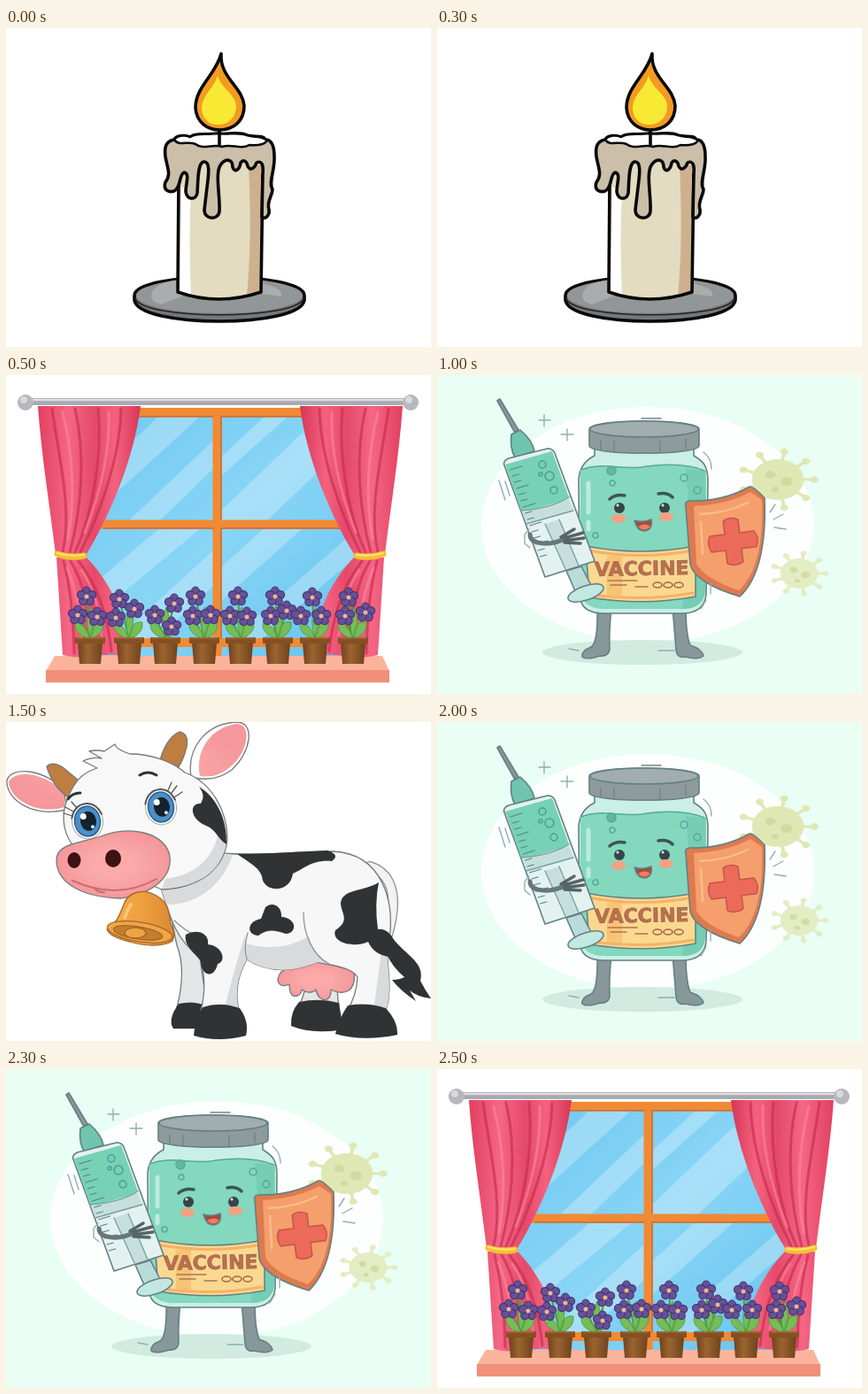
Write an HTML page that moves like this. It is 480 by 360 pixels and loops after 3 s.

```html
<!DOCTYPE html>
<html lang="en">
<head>
<meta charset="utf-8">
<title>Picture slideshow</title>
<style>
  html, body { margin: 0; width: 100%; height: 100%; overflow: hidden; background: #fff; }
  svg { display: block; width: 100vw; height: 100vh; }
  .scene { display: none; }
  .scene.on { display: inline; }
  path, ellipse, circle, line { stroke-linecap: round; stroke-linejoin: round; }
  #candle .ink { stroke: #080808; stroke-width: 3.6; }
  #vaccine .ink { stroke: #648083; stroke-width: 1.6; }
  #cow .ink { stroke: #77797b; stroke-width: 1.3; }
  .none { fill: none; }
</style>
</head>
<body>
<svg viewBox="0 0 480 360">
  <defs>
    <linearGradient id="glass" x2="1" y2="1">
      <stop stop-color="#70c8f1"/><stop offset=".5" stop-color="#88d5f6"/><stop offset="1" stop-color="#67c3ef"/>
    </linearGradient>
    <linearGradient id="cloth">
      <stop stop-color="#e2405f"/><stop offset=".3" stop-color="#f56685"/><stop offset=".55" stop-color="#e5496a"/>
      <stop offset=".75" stop-color="#f4627f"/><stop offset="1" stop-color="#d73757"/>
    </linearGradient>
    <linearGradient id="pot">
      <stop stop-color="#70421d"/><stop offset=".4" stop-color="#9b642f"/><stop offset="1" stop-color="#70421d"/>
    </linearGradient>
    <radialGradient id="skin"><stop offset=".4" stop-color="#fba9a9"/><stop offset="1" stop-color="#f5979b"/></radialGradient>
    <linearGradient id="brass"><stop stop-color="#f6ad4a"/><stop offset=".5" stop-color="#f0a040"/><stop offset="1" stop-color="#d98a33"/></linearGradient>
  </defs>

  <g id="candle" class="scene">
    <path class="ink" fill="#747879" d="M145 302C145 274 337 274 337 302V307C333 339 149 339 145 307Z"/>
    <ellipse cx="241" cy="302" rx="94" ry="20" fill="#929696"/>
    <path fill="#a9adad" d="M164 302C166 286 194 284 200 284V302L175 312Q164 309 164 302ZM287 288Q314 293 311 303L289 300Z"/>
    <path class="none" stroke="#222" stroke-width="1.5" d="M146 305C153 330 329 330 336 305"/>
    <path fill="#e3dcc1" d="M195 145L194 298Q240 314 288 298L290 145Z"/>
    <path fill="#fff" d="M198 180H209Q206 240 209 303L196 298Z"/>
    <path fill="#cdb18f" d="M274 155H289L287 298L272 303Q278 240 274 155Z"/>
    <path class="ink none" d="M195 170L194 298Q240 314 288 298L290 165"/>
    <path class="ink" fill="#cbbfaa" d="M190 126C179 128 179 137 180 145C182 158 187 165 180 174C177 183 184 186 190 184C198 180 195 166 201 163C208 164 203 175 203 185C205 195 215 194 216 186C217 175 216 153 223 151C231 150 229 165 227 180L224 205C224 217 240 217 241 207C242 190 236 165 242 155C248 146 256 148 256 157C258 164 264 160 265 152C268 148 272 150 273 156C276 162 281 158 283 152C289 149 291 155 290 165L289 213C292 217 298 212 297 205C294 195 301 190 301 182C296 175 304 160 303 145C303 133 300 126 293 126C290 120 280 124 272 121C262 116 250 121 240 119C225 121 215 118 208 123C200 120 192 122 190 126Z"/>
    <path fill="#fff" stroke="#080808" stroke-width="2.5" d="M190 126C195 134 205 127 214 131C222 138 235 130 244 134C255 130 265 138 275 132C285 133 295 131 294 126C286 121 280 124 272 121C262 117 250 121 240 119C225 121 215 118 208 123C200 120 193 122 190 126Z"/>
    <path class="ink" d="M241 113V132"/>
    <path class="ink" fill="#f39a22" d="M243 29C237 53 214 66 214 90C215 107 228 115 241 115C258 115 269 104 269 88C268 67 241 56 243 29Z"/>
    <path fill="#f8e934" d="M239 53C236 67 221 76 221 91C222 104 231 110 240 109C252 109 260 100 260 88C259 74 242 68 239 53Z"/>
  </g>

  <g id="window" class="scene">
    <rect x="86" y="38" width="312" height="282" fill="url(#glass)"/>
    <g fill="#fff" opacity=".27">
      <path d="M172 47H219L120 137V96ZM234 74V106L174 164H139ZM292 47H318L243 114V92ZM335 65L362 100L295 164H243V153Z"/>
      <path d="M172 174H219L105 268V231ZM234 198V238L170 297H126ZM290 174H334L243 255V217ZM385 184L395 205L290 297H255Z"/>
    </g>
    <path class="none" stroke="#f18a35" stroke-width="10" style="stroke-linecap:butt" d="M86 42H398M238.500 40V318M86 168.500H398M86 302H398"/>
    <path class="none" stroke="#cf682b" stroke-width="1.500" d="M110 173H234M243 173H385M243 47V163M243 174V297M145 47H234M243 47H340"/>
    <path d="M55 317H425L433 334H45Z" fill="#fbb49b"/>
    <path d="M45 333H433V347H45Z" fill="#f28f79"/>
    <path d="M20 30H458" stroke="#a9a9b1" stroke-width="8"/>
    <path d="M22 28H457" stroke="#dedee3" stroke-width="2.500"/>
    <g id="curtain">
      <path fill="url(#cloth)" d="M36 35H152C145 92 118 158 91 202H56C49 145 40 90 36 35ZM57 206H91C107 222 123 247 129 270L134 318C110 311 90 323 64 316Z"/>
      <path class="none" stroke="#c72d4e" stroke-width="3" opacity=".65" d="M52 38C60 95 75 152 64 200M78 38C91 94 84 156 72 200M104 38C109 92 98 156 78 200M130 38C129 92 107 154 84 200M65 210Q76 252 77 314M73 210Q95 246 96 312M82 210Q113 250 119 312"/>
      <path class="none" stroke="#ff8ba2" stroke-width="3" opacity=".55" d="M64 42C77 95 77 145 70 185M116 42C118 92 103 142 89 178M69 218Q84 254 86 300M85 220Q105 249 108 294"/>
      <path class="none" stroke="#f2c22f" stroke-width="7" d="M58 202Q72 207 88 204"/>
      <path class="none" stroke="#ffe46c" stroke-width="2" d="M58 201Q72 205 88 203"/>
    </g>
    <use href="#curtain" transform="matrix(-1 0 0 1 484 0)"/>
    <circle cx="22" cy="31" r="9" fill="#b7b7be"/><circle cx="20" cy="28" r="4" fill="#d8d8dd"/>
    <circle cx="457" cy="31" r="9" fill="#b7b7be"/><circle cx="455" cy="28" r="4" fill="#d8d8dd"/>
    <g id="pots"></g>
  </g>

  <g id="vaccine" class="scene">
    <path fill="#e9fef4" d="M0 0H480V360H0Z"/>
    <ellipse cx="238" cy="169" rx="188" ry="133" fill="#fdfffe"/>
    <ellipse cx="232" cy="313" rx="113" ry="14" fill="#d2ebe1"/>
    <g id="viruses"></g>
    <g class="ink" fill="#87979a">
      <path d="M181 262H197Q194 290 195 310Q193 318 184 317Q170 322 164 318Q163 311 174 307Q182 302 181 262Z"/>
      <path d="M266 262H281Q281 293 286 305Q299 309 301 317Q295 322 280 318Q271 320 270 310Z"/>
    </g>
    <path class="ink" fill="#c9efe6" d="M178 84H290V91C302 98 306 104 306 120L304 247C303 262 294 269 276 269H188C169 269 161 261 161 246L160 120C160 104 168 96 178 91Z"/>
    <path fill="#83d8be" d="M162 107C186 97 211 109 237 103Q278 98 304 108V194H162Z"/>
    <path fill="#83d8be" d="M163 190H303V243Q301 264 278 264H190Q163 264 163 243Z"/>
    <path fill="#68c4aa" opacity=".5" d="M281 106L303 108V244Q301 264 276 264Q291 210 281 106Z"/>
    <path class="none" stroke="#d6f4ea" stroke-width="5" opacity=".7" d="M171 122V155M171 166V174"/>
    <g class="none" stroke="#5aa898" stroke-width="1.500">
      <path d="M163 107C186 97 211 109 237 103Q278 98 302 108"/>
      <circle cx="197" cy="108" r="5" fill="#5fb8a1"/><circle cx="198" cy="122" r="3"/><circle cx="279" cy="116" r="4"/><circle cx="294" cy="130" r="4"/><circle cx="179" cy="181" r="3"/>
    </g>
    <path class="ink" fill="#8d9b9d" d="M172 61C172 49 296 49 296 61V80C295 91 173 91 172 80Z"/>
    <ellipse class="ink" cx="234" cy="61" rx="61" ry="9" fill="#a1adae"/>
    <path class="none" stroke="#758487" stroke-width="1.500" d="M185 74V84M200 75V86M252 75V87M281 72V83M231 49H253"/>
    <path class="ink" fill="#fbd890" d="M168 193Q230 205 292 193V250Q234 261 172 251Z"/>
    <path class="none" stroke="#f5b268" stroke-width="3" d="M170 198Q230 209 290 198M174 248Q232 256 289 246"/>
    <path d="M192 204H209V251H192Z" fill="#f5b768" opacity=".6"/>
    <text x="178" y="226" font-family="'DejaVu Sans',sans-serif" font-size="22" font-weight="700" fill="#bb714f" stroke="#8f5a47" stroke-width=".6" transform="rotate(-1 232 220)">VACCINE</text>
    <path class="none" stroke="#b0754f" stroke-width="1.500" d="M193 232H226M196 237H214M224 239H238"/>
    <g class="none" stroke="#a36547" stroke-width="1.500"><ellipse cx="249" cy="237" rx="5" ry="3"/><ellipse cx="261" cy="237" rx="5" ry="3"/><ellipse cx="273" cy="237" rx="5" ry="3"/></g>
    <g fill="#364548"><circle cx="206" cy="150" r="6"/><circle cx="257" cy="150" r="6"/></g>
    <g fill="#dff5ee"><circle cx="204" cy="147" r="1.500"/><circle cx="255" cy="147" r="1.500"/></g>
    <path class="none" stroke="#3f5355" stroke-width="3.500" d="M195 140Q202 134 212 136M250 134Q260 132 266 138"/>
    <g fill="#f6a083"><ellipse cx="205" cy="162" rx="8" ry="5"/><ellipse cx="259" cy="160" rx="8" ry="5"/></g>
    <path class="ink" fill="#a14c42" d="M223 164Q232 167 242 163Q244 175 234 176Q226 176 223 164Z"/>
    <path fill="#f47b61" d="M227 171Q235 166 241 171Q234 178 227 171Z"/>

    <path class="ink" fill="#8a9899" d="M68 29L71 27L92 62L88 65Z"/>
    <path class="ink" fill="#6fc5ae" d="M84 67L94 62Q108 74 110 86L88 93Q82 82 84 67Z"/>
    <path class="ink" fill="#e3f2f1" d="M76 102Q74 97 81 94L125 83Q131 83 133 88L178 210L122 228Z"/>
    <path fill="#77d1b5" d="M77 101L130 86L149 138Q128 151 95 153Z"/>
    <path fill="#c6dfdd" d="M96 155L149 140L154 153L101 168ZM122 168L138 163L160 215L145 219Z"/>
    <path class="none" stroke="#76a09c" stroke-width="1.300" d="M95 153Q128 151 149 138M101 168L154 153M122 168L145 219M138 163L160 215"/>
    <path id="ticks" class="none" stroke="#5a8581" stroke-width="1.300"/>
    <g class="none" stroke="#4d9e8e" stroke-width="1.500"><circle cx="119" cy="101" r="4"/><circle cx="127" cy="114" r="5"/><circle cx="132" cy="130" r="4"/><circle cx="117" cy="112" r="2"/></g>
    <path class="ink" fill="#b9dcda" d="M146 221L163 216L176 241L157 246Z"/>
    <ellipse class="ink" cx="168" cy="246" rx="21" ry="8" transform="rotate(-19 168 246)" fill="#c2e8e1"/>
    <path class="none" stroke="#66777a" stroke-width="5" d="M105 180Q105 189 120 190Q133 191 146 184"/>
    <path class="none" stroke="#566568" stroke-width="3.500" d="M140 183L155 174M144 184L165 178M144 187L166 184M144 189L162 190"/>

    <path class="ink" fill="#dd7a50" d="M281 149Q279 143 285 142Q323 143 353 126Q358 126 370 139Q373 221 342 250Q292 235 286 214Z"/>
    <path fill="#f59f6c" d="M290 148Q328 146 354 132L367 141Q370 216 341 243Q302 230 293 213Z"/>
    <path class="none" stroke="#fbbd8a" stroke-width="2.500" d="M297 157Q327 156 351 144M298 166L300 202"/>
    <path fill="#ec6a5a" stroke="#c2574c" stroke-width="1.500" transform="rotate(-7 334 188)" d="M326 164Q334 159 343 164V179H359Q365 187 360 197H343V212Q334 217 325 212V197H309Q304 188 309 179H326Z"/>
    <path class="none" stroke="#8fb0b1" stroke-width="1.400" d="M121 45V58M115 51H128M147 61V74M140 67H154M301 87Q310 94 310 106M380 163L391 157M381 172L394 174M376 155L382 146M77 120L82 136M70 119L77 141M104 174L99 180V190L105 195M309 235V247M304 254L298 264M149 309L160 311M250 311H268"/>
  </g>

  <g id="cow" class="scene">
    <path class="none" stroke="#8b8d8f" stroke-width="12" d="M411 163C441 173 441 206 431 240"/>
    <path class="none" stroke="#f2f2f3" stroke-width="9.500" d="M411 163C441 173 441 206 431 240"/>
    <path fill="#303234" d="M434 240C448 262 474 270 468 292Q473 302 480 312Q464 310 456 303L463 315Q445 303 436 291Q444 291 450 288Q436 276 430 262Z"/>
    <g class="ink" fill="#e4e5e6"><path d="M187 223L215 238L227 322H193Q204 280 193 252Z"/><path d="M338 255L386 265Q370 290 376 320H331Q344 295 338 255Z"/></g>
    <path fill="#303234" d="M195 318Q211 314 226 320L228 346H189Q182 336 195 318ZM331 316Q354 311 376 317L381 347Q347 353 322 343Q321 327 331 316Z"/>
    <path class="ink" fill="url(#skin)" d="M310 283C304 292 308 301 320 296C320 316 334 310 334 302C341 307 348 305 350 302C354 319 368 316 367 302C381 309 396 305 393 282C381 266 326 264 310 283Z"/>
    <path class="ink" fill="#f7f7f7" d="M175 187C184 216 190 244 219 266Q228 294 220 326H263C257 299 265 281 272 268C300 286 331 280 352 271C376 276 391 278 397 288Q396 308 385 327H429C439 292 426 270 433 245C439 202 425 149 370 146C320 146 290 152 245 148Z"/>
    <path fill="#d9dadb" d="M271 250Q310 261 342 242Q347 262 365 273L352 271C331 280 300 286 272 268ZM245 148L256 150C244 185 215 207 181 206L175 187ZM263 326C257 299 265 281 272 268L270 240Q256 285 246 326ZM429 327C439 292 426 270 433 245L425 250Q420 290 415 327Z"/>
    <path class="none" stroke="#929496" stroke-width="1.300" d="M336 215C336 241 347 264 365 273M272 268Q268 255 273 238M190 224Q204 237 212 239"/>
    <g fill="#303234">
      <path d="M222 322Q242 315 264 323Q275 338 271 354Q240 362 212 354Q213 336 222 322ZM386 320Q408 316 429 323Q443 338 442 353Q403 361 372 352Q376 334 386 320Z"/>
      <path d="M261 149Q312 148 363 145Q378 150 368 157C346 155 338 165 324 171C321 194 290 193 289 174C285 163 275 159 261 149Z"/>
      <path d="M293 209C301 202 312 208 311 220C328 221 330 238 316 239C302 234 295 234 285 241C271 240 272 225 288 222Z"/>
      <path d="M421 181Q416 205 420 234Q432 232 440 250Q442 264 432 265Q415 262 409 248C391 256 367 248 372 235C389 224 379 217 378 205C379 188 403 192 421 181Z"/>
      <path d="M203 240C218 232 230 240 228 251C244 252 250 270 239 273C235 291 220 286 220 270C215 262 200 252 203 240Z"/>
    </g>
    <g class="ink" fill="#fff">
      <path d="M66 78C45 53 6 49 1 66C0 88 30 108 68 99Z"/>
      <path d="M209 62C204 30 225 1 262 0C282 2 276 35 255 54Q235 69 209 62Z"/>
    </g>
    <path fill="url(#skin)" d="M66 80C45 57 10 53 3 68C5 89 37 105 66 96ZM219 61C213 32 232 5 262 2C279 5 272 36 253 51Q238 64 219 61Z"/>
    <path class="ink" fill="#c07d42" d="M46 50Q52 44 64 51L82 66L70 85Q52 72 46 50ZM173 48C176 32 184 16 196 11Q207 14 204 28Q200 46 190 57Z"/>
    <path class="ink" fill="#f8f8f8" d="M76 73C83 60 93 55 103 52L87 44Q98 39 108 41L94 33Q102 31 111 33L123 25Q124 31 140 36C163 36 187 44 202 57C232 68 250 100 250 132C247 165 220 187 176 189L90 154C62 132 58 103 76 73Z"/>
    <path fill="#d9dadb" d="M249 128C249 165 220 187 176 188L180 177C213 173 235 154 240 124Z"/>
    <path fill="#303234" d="M218 73C238 85 250 110 249 138C239 132 238 122 226 117C207 109 207 91 220 92Q226 83 218 73Z"/>
    <g id="eyes"></g>
    <path class="none" stroke="#303234" stroke-width="3" d="M70 87Q75 80 84 80M151 60Q160 54 170 60"/>
    <path class="none" stroke="#55585a" stroke-width="1.300" d="M75 106L65 103M76 101L67 96M80 97L74 90M187 80L193 72M190 85L199 79M183 77L187 68"/>
    <path class="ink" fill="url(#skin)" d="M57 157C56 137 83 137 107 129C138 117 174 123 184 147C191 174 166 194 129 199C90 198 58 184 57 157Z"/>
    <path class="none" stroke="#c96d73" stroke-width="2" d="M75 179Q126 202 170 177M99 187Q104 193 111 192"/>
    <g fill="#3d1214"><ellipse cx="77" cy="156" rx="7.500" ry="9"/><ellipse cx="121" cy="154" rx="9" ry="10"/></g>
    <g stroke="#a5662a" stroke-width="1.300">
      <path fill="url(#brass)" d="M114 234C126 226 128 218 133 206C138 191 156 188 168 195C184 203 184 214 186 228Q192 238 188 247C178 254 156 253 140 248Q118 243 114 234Z"/>
      <ellipse cx="151" cy="237" rx="37" ry="11" transform="rotate(9 151 237)" fill="#f0a546"/>
      <ellipse cx="149" cy="238" rx="28" ry="7" transform="rotate(9 149 238)" fill="#c67d2e"/>
      <ellipse cx="146" cy="238" rx="12" ry="6" fill="#eda445"/>
    </g>
    <path class="none" stroke="#fac677" stroke-width="4" d="M141 206Q136 214 134 221"/>
  </g>
</svg>
<script>
const $ = id => document.getElementById(id);
const ring = (n, draw) => Array.from({ length: n }, (_, i) => draw(i * 360 / n)).join('');

// Window: potted violets
const potXs = [95, 139, 180, 224, 265, 307, 349, 392];
const blooms = [[91, 250], [81, 271], [103, 273], [128, 253], [145, 264], [124, 274], [168, 271], [190, 258], [187, 284],
  [214, 250], [211, 272], [231, 271], [262, 250], [253, 272], [272, 273], [304, 250], [299, 272], [317, 266],
  [346, 251], [333, 272], [356, 272], [387, 251], [383, 272], [406, 268]];

const leaves = x => `<path fill="#77bd55" stroke="#46984d" stroke-width=".8"
  d="M${x} 298Q${x - 21} 292 ${x - 16} 277Q${x - 4} 284 ${x} 298Q${x + 2} 276 ${x + 15} 279Q${x + 17} 292 ${x} 298ZM${x} 298Q${x - 7} 276 ${x + 1} 262Q${x + 9} 281 ${x} 298"/>`;
const pot = x => `<path fill="url(#pot)" d="M${x - 14} 302H${x + 14}L${x + 12} 326H${x - 12}Z"/>
  <rect x="${x - 17}" y="296" width="34" height="7" rx="1" fill="#845021"/>
  <path stroke="#b47b40" d="M${x - 15} 297H${x + 15}"/>`;
const bloom = ([x, y]) => `<g transform="translate(${x} ${y})">` +
  ring(5, a => `<ellipse cy="-6" rx="4.600" ry="5" transform="rotate(${a})" fill="#665098" stroke="#403269" stroke-width="1"/>`) +
  '<circle r="2.500" fill="#eeb78e"/></g>';
const stem = ([x, y], i) => `<path class="none" stroke="#4e9a47" stroke-width="2" d="M${x} ${y}L${potXs[Math.floor(i / 3)]} 298"/>`;
$('pots').innerHTML = blooms.map(stem).join('') + potXs.map(leaves).join('') +
  potXs.map(pot).join('') + blooms.map(bloom).join('');

// Vaccine: pale viruses and the syringe scale
const virus = (x, y, r, color) => `<g transform="translate(${x} ${y}) scale(1 .78)" fill="${color}" stroke="${color}">` +
  ring(9, a => `<g transform="rotate(${a + 10})"><path stroke-width="4" d="M0 0V${-r * 1.38}"/><circle cy="${-r * 1.42}" r="${r * .14}"/></g>`) +
  `<circle r="${r}"/><g fill="#cbd698" stroke="none" opacity=".7"><circle cx="${-r * .3}" cy="${-r * .25}" r="${r * .2}"/>` +
  `<circle cx="${r * .35}" cy="${r * .1}" r="${r * .23}"/><circle cx="${-r * .1}" cy="${r * .5}" r="${r * .14}"/></g></g>`;
$('viruses').innerHTML = virus(385, 118, 29, '#dfe8b4') + virus(409, 224, 21, '#e3edc3');
$('ticks').setAttribute('d', Array.from({ length: 15 }, (_, i) =>
  `M${83 + i * 2.4} ${107 + i * 7}l${i % 3 ? 7 : 13} ${i % 3 ? -2 : -4}`).join(''));

// Cow: eyes
const eye = (x, y) => `<g transform="translate(${x} ${y}) rotate(-8)">
  <ellipse rx="17.500" ry="20" fill="#fff" stroke="#a5a8aa"/>
  <ellipse rx="14.500" ry="17" fill="#4b8fc6" stroke="#2c5f8e" stroke-width="1.500"/>
  <ellipse cx="1" rx="9" ry="11" fill="#15212c"/><circle cx="-4" cy="-6" r="3.500" fill="#fff"/>
  <circle cx="5" cy="7" r="2" fill="#d7f0ff"/>
  <path class="none" stroke="#55585a" stroke-width="2" d="M-17-6Q-12-20 0-20Q12-20 17-6"/></g>`;
$('eyes').innerHTML = eye(92, 112) + eye(175, 96);

const scenes = ['candle', 'window', 'vaccine', 'cow'].map($);
const order = [0, 1, 2, 3, 2, 1];
const hold = 500;
const start = performance.now();

function show() {
  const current = order[Math.floor((performance.now() - start) / hold) % order.length];
  scenes.forEach((scene, i) => scene.classList.toggle('on', i === current));
  requestAnimationFrame(show);
}
show();
</script>
</body>
</html>
```
